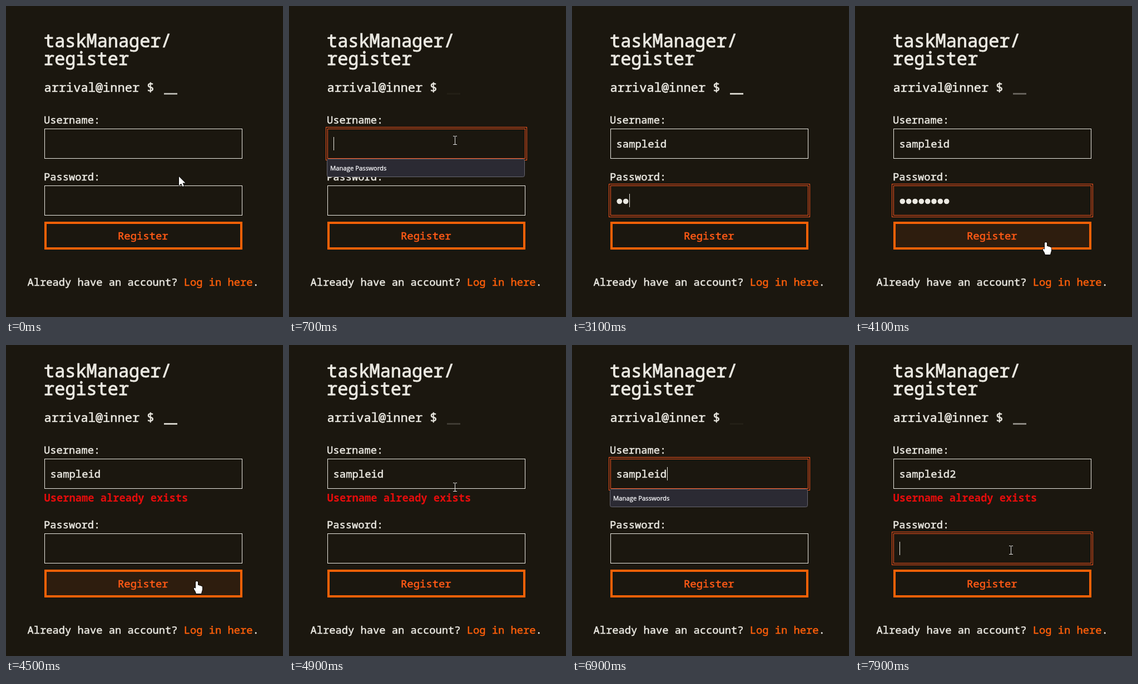
Recreate the animation shown at these times as an HTML page with a canvas. Size 498 px wide and 558 px high, loop 8000 ms.

```html
<!DOCTYPE html>
<html lang="en">
<head>
<meta charset="utf-8">
<title>Register</title>
<style>
html, body { margin: 0; width: 100%; height: 100%; overflow: hidden; background: #1b170f; }
canvas { display: block; }
</style>
</head>
<body>
<canvas id="stage" width="498" height="558"></canvas>
<script>
const ctx = document.getElementById('stage').getContext('2d');
const LOOP = 8000, STEP = 100;
const BG = '#1b170f', INK = '#ebe9e2', ORANGE = '#ff5f0a', FOCUS = '#f8541e';
const MONO = '"Noto Sans Mono", "DejaVu Sans Mono", monospace';
const SIZE = 18.75, CHAR = SIZE * 0.6;
const INPUT_SIZE = 18.9, INPUT_CHAR = INPUT_SIZE * 0.6;
const USER = 'sampleid';
const RELOAD = 4500;

// Mouse track: time, x, y. It is hidden while typing.
const mouse = [
  [0, 311, 306], [150, 311, 306], [500, 298, 241], [3600, 298, 241],
  [4000, 343, 424], [4500, 343, 424], [4900, 298, 255], [5600, 298, 255],
  [6200, 282, 262], [6500, 280, 236], [7200, 280, 236], [7600, 280, 368], [LOOP, 280, 368]
];
const hidden = [[1000, 3600], [6900, 7200]];

// Field focus: start, end, field, popup shown.
const focuses = [
  [500, 2800, 'user', true], [2800, RELOAD, 'pass', false],
  [6600, 7600, 'user', true], [7600, LOOP, 'pass', false]
];
// Typing: first key, gap, number of keys.
const typing = { user: [1000, 130, 8], pass: [2950, 90, 8], digit: [7000, 100, 1] };

const within = (t, [a, b]) => t >= a && t < b;
const typed = (t, [start, gap, n]) => Math.max(0, Math.min(n, Math.floor((t - start) / gap) + 1));

function mouseAt(t) {
  const i = mouse.findIndex((p, k) => k && t <= p[0]);
  const [t0, x0, y0] = mouse[i - 1], [t1, x1, y1] = mouse[i];
  const u = (t - t0) / (t1 - t0), e = u * u * (3 - 2 * u);
  return [x0 + (x1 - x0) * e, y0 + (y1 - y0) * e];
}

function text(str, x, y, size = SIZE, color = INK, weight = 400, family = MONO) {
  ctx.font = `${weight} ${size}px ${family}`;
  ctx.fillStyle = color;
  ctx.fillText(str, x, y);
  if (weight > 400) return;
  // A hairline outline gives regular text its sturdier stems.
  ctx.strokeStyle = color;
  ctx.lineWidth = size * 0.028;
  ctx.strokeText(str, x, y);
}

function frame(x, y, w, h, color, line = 1) {
  ctx.strokeStyle = color;
  ctx.lineWidth = line;
  ctx.strokeRect(x + line / 2, y + line / 2, w - line, h - line);
}

function field(y, focused) {
  frame(69, y, 356, 54, focused ? FOCUS : INK);
  if (focused) frame(66, y - 3, 362, 60, FOCUS);
}

function popup(y) {
  ctx.beginPath();
  ctx.roundRect(68.5, y + 0.5, 355, 32, 3);
  ctx.fillStyle = '#2b2a33';
  ctx.fill();
  ctx.strokeStyle = '#67666f';
  ctx.lineWidth = 1;
  ctx.stroke();
  text('Manage Passwords', 74, y + 21, 11.3, '#fbfbfe', 400, '"Open Sans", "Noto Sans", sans-serif');
}

function shape(x, y, path) {
  ctx.save();
  ctx.translate(Math.round(x), Math.round(y));
  const p = new Path2D(path);
  ctx.lineWidth = 1.5;
  ctx.lineJoin = 'round';
  ctx.strokeStyle = '#000';
  ctx.stroke(p);
  ctx.fillStyle = '#fff';
  ctx.fill(p);
  ctx.restore();
}

const ARROW = 'M0 0V16L4 12.5L6.5 18L9 17L6.5 11.5H11.5Z';
const HAND = 'M-2 1Q0-1 2 1V7Q4 6 5 8Q7 7 8 9Q10 8 10 11V15Q9 18 8 22H-1Q-2 18-5 14Q-6 11-3 12L-2 13Z';

function ibeam(x, y) {
  x = Math.round(x);
  y = Math.round(y);
  ctx.fillStyle = '#e4e4e4';
  ctx.fillRect(x, y - 7, 1, 15);
  for (const edge of [y - 8, y + 7]) {
    ctx.fillRect(x - 3, edge, 3, 1);
    ctx.fillRect(x + 1, edge, 3, 1);
  }
}

function draw(t) {
  const error = t >= RELOAD;
  const shift = error ? 16 : 0;
  const userY = 220 - shift, passY = 322 + shift, buttonY = 387 + shift;
  const focus = focuses.find(f => within(t, f));
  const active = focus && focus[2];
  const [mx, my] = mouseAt(t);
  const mouseShown = !hidden.some(h => within(t, h));
  const over = (top, h) => mx > 69 && mx < 425 && my >= top && my < top + h;

  ctx.fillStyle = BG;
  ctx.fillRect(0, 0, 498, 558);

  text('taskManager/', 68, 74 - shift, 31.9);
  text('register', 68, 106 - shift, 31.9);
  text('arrival@inner $', 68.5, 154 - shift, 22);

  // Prompt underscore fades in and out.
  const phase = (t + (error ? 200 : 0) - 1350) / 1600;
  ctx.globalAlpha = Math.max(0, 0.45 + 0.5 * Math.cos(2 * Math.PI * phase));
  ctx.fillStyle = INK;
  ctx.fillRect(284, 156 - shift, 24, 3);
  ctx.globalAlpha = 1;

  text('Username:', 68, 211 - shift);
  field(userY, active === 'user');
  const name = USER.slice(0, typed(t, typing.user)) + '2'.repeat(typed(t, typing.digit));
  text(name, 79.5, userY + 34, INPUT_SIZE);
  if (error) text('Username already exists', 68.5, 281, SIZE, '#e60c0c', 700);

  text('Password:', 68, 313 + shift);
  field(passY, active === 'pass');
  const dots = error ? 0 : typed(t, typing.pass);
  ctx.fillStyle = INK;
  for (let i = 0; i < dots; i++) {
    ctx.beginPath();
    ctx.arc(85.3 + i * INPUT_CHAR, passY + 28.5, 4.8, 0, 7);
    ctx.fill();
  }

  const hover = mouseShown && over(buttonY, 50);
  if (hover) {
    ctx.fillStyle = '#2e1d0e';
    ctx.fillRect(69, buttonY, 356, 50);
  }
  frame(69, buttonY, 356, 50, '#fb6107', 4);
  text('Register', 201, buttonY + 32, INPUT_SIZE, '#ff5a16');

  text('Already have an account?', 38.5, 502 + shift);
  text('Log in here', 38.5 + 25 * CHAR, 502 + shift, SIZE, ORANGE);
  text('.', 38.5 + 36 * CHAR, 502 + shift);

  if (focus) {
    if (focus[3]) popup(userY + 54);
    // The caret's blink restarts with each key.
    const keys = Object.values(typing).flatMap(([start, gap, n]) =>
      Array.from({ length: n }, (_, i) => start + i * gap));
    const last = Math.max(focus[0], ...keys.filter(k => k <= t));
    if (Math.floor((t - last) / 500) % 2 === 0) {
      const [count, top] = active === 'user' ? [name.length, userY] : [dots, passY];
      ctx.fillStyle = INK;
      ctx.fillRect(80 + Math.round(count * INPUT_CHAR), top + 15, 1, 24);
    }
  }

  if (!mouseShown) return;
  if (over(userY, 54) || over(passY, 54) || (error && over(258, 28))) ibeam(mx, my);
  else shape(mx, my, hover ? HAND : ARROW);
}

function tick(now) {
  draw(Math.floor((now % LOOP) / STEP) * STEP);
  requestAnimationFrame(tick);
}
requestAnimationFrame(tick);
</script>
</body>
</html>
```
